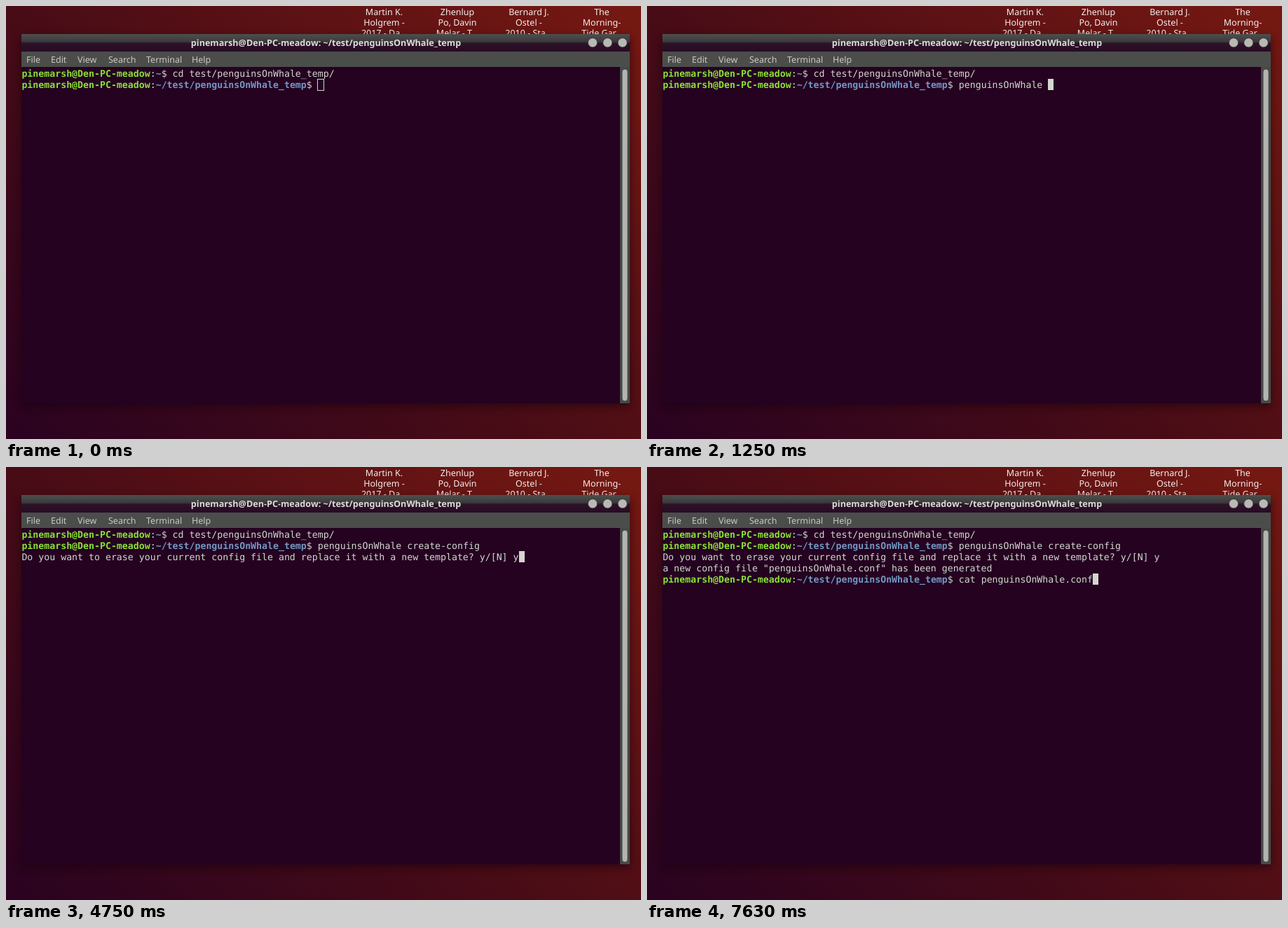
An HTML page that plays this animation: 906 by 618 pixels, repeating every 8 s.

```html
<!DOCTYPE html>
<html lang="en">
<head>
<meta charset="utf-8">
<title>Terminal session</title>
<style>
  html, body { margin: 0; width: 100%; height: 100%; overflow: hidden; background: #3c0918; }
  svg { display: block; width: 906px; height: 618px; }
  text { white-space: pre; text-rendering: geometricPrecision; }
  .ui { font: 12.5px "Noto Sans", "Open Sans", sans-serif; }
  .label { fill: #f4eeec; text-anchor: middle; }
  .menu { fill: #c9cac6; }
  .title { font-size: 12.6px; font-weight: 700; fill: #dcdcd8; text-anchor: middle; }
  .term { font: 13.24px "DejaVu Sans Mono", "Noto Sans Mono", monospace; fill: #d3d7cf; }
  .user { font-weight: 700; fill: #8ae234; }
  .path { font-weight: 700; fill: #7398c3; }
</style>
</head>
<body>
<svg viewBox="0 0 906 618">
  <defs>
    <linearGradient id="desk" gradientUnits="userSpaceOnUse" x1="130" y1="690" x2="776" y2="-72">
      <stop offset="0" stop-color="#2b0320"/>
      <stop offset=".46" stop-color="#490c16"/>
      <stop offset="1" stop-color="#741812"/>
    </linearGradient>
    <linearGradient id="bar" x2="0" y2="1">
      <stop offset="0" stop-color="#4d4f4d"/>
      <stop offset=".44" stop-color="#3b3a3b"/>
      <stop offset=".52" stop-color="#2c1329"/>
      <stop offset="1" stop-color="#290a24"/>
    </linearGradient>
    <filter id="blur" x="-5%" y="-5%" width="110%" height="110%">
      <feGaussianBlur stdDeviation="6"/>
    </filter>
  </defs>
  <rect width="906" height="618" fill="url(#desk)"/>
  <g id="labels" class="ui label"></g>
  <rect x="21" y="45" width="870" height="527" fill="#18000f" opacity=".55" filter="url(#blur)"/>
  <rect x="22" y="40" width="868" height="527" fill="#240220"/>
  <rect x="22" y="40" width="868" height="25" fill="url(#bar)"/>
  <rect x="22" y="65" width="868" height="22" fill="#4b4d4b"/>
  <rect x="876" y="87" width="14" height="480" fill="#474947"/>
  <rect x="879" y="90" width="8" height="474" rx="4" fill="#b4b4ae" stroke="#3c3d3b" stroke-width=".8"/>
  <g fill="#b9b9b4" stroke="#3a2c38" stroke-width=".8">
    <circle cx="837" cy="52.3" r="6.6"/>
    <circle cx="858.3" cy="52.3" r="6.6"/>
    <circle cx="879.6" cy="52.3" r="6.6"/>
  </g>
  <text id="title" class="ui title" x="456.5" y="56.5"></text>
  <g id="menu" class="ui menu"></g>
  <g id="screen" class="term"></g>
  <rect id="block" width="8" height="16" fill="#d3d7cf"/>
  <rect id="hollow" x="444.5" y="104.5" width="9" height="16" fill="none" stroke="#d3d7cf"/>
</svg>
<script>
const LOOP = 8000, LEFT = 22.4, PITCH = 7.97, ROW = 16;
const USER = 'pinemarsh@Den-PC-meadow', DIR = '~/test/penguinsOnWhale_temp';
const QUESTION = 'Do you want to erase your current config file and replace it with a new template? y/[N] ';
const TOOL = 'penguinsOnWhale', CREATE = TOOL + ' create-config';
const $ = id => document.getElementById(id);

function addText(parent, x, y, content, cls) {
  const el = document.createElementNS('http://www.w3.org/2000/svg', 'text');
  el.setAttribute('x', x);
  el.setAttribute('y', y);
  if (cls) el.setAttribute('class', cls);
  el.textContent = content;
  parent.append(el);
  return el;
}
const colX = col => LEFT + col * PITCH;
const put = (row, col, content, cls) =>
  addText($('screen'), colX(col), 101 + row * ROW, content, cls);

// Draws a shell prompt and returns the column where the command starts.
function prompt(row, dir) {
  const start = USER.length + 1, end = start + dir.length;
  put(row, 0, USER, 'user');
  put(row, start - 1, ':');
  put(row, start, dir, 'path');
  put(row, end, '$');
  return end + 2;
}

[
  [539.5, 'Martin K.', 'Holgrem -', '2017 - Da…'],
  [644, 'Zhenlup', 'Po, Davin', 'Melar - T…'],
  [746, 'Bernard J.', 'Ostel -', '2010 - Sta…'],
  [850, 'The', 'Morning-', 'Tide Gar…']
].forEach(([x, ...lines]) =>
  lines.forEach((s, i) => addText($('labels'), x, 13 + i * 15, s)));

Object.entries({ File: 29, Edit: 64, View: 102, Search: 146, Terminal: 200, Help: 265 })
  .forEach(([name, x]) => addText($('menu'), x, 80.5, name));
$('title').textContent = USER + ': ' + DIR;

put(0, prompt(0, '~'), 'cd test/penguinsOnWhale_temp/');
const cmdCol = prompt(1, DIR);
const command = put(1, cmdCol, '');
const question = put(2, 0, '');

// Everything that appears after the answer is given.
const before = $('screen').childElementCount;
put(3, 0, `a new config file "${TOOL}.conf" has been generated`);
prompt(4, DIR);
const follow = put(4, cmdCol, '');
const late = [...$('screen').children].slice(before);

// Each entry: time, row being edited, its text, cursor shown.
const steps = [[0, 1, '', false], [250, 1, '', true]];
const type = (row, base, added, times) =>
  times.forEach((t, i) => steps.push([t, row, base + added.slice(0, i + 1), true]));

type(1, '', 'peng', [630, 750, 880, 1000]);
steps.push([1130, 1, TOOL + ' ', true], [1750, 1, TOOL + ' ', false]);
type(1, TOOL + ' ', 'create-conf',
  [1880, 2000, 2130, 2380, 2500, 2630, 2750, 2880, 3000, 3130, 3250]);
steps.push(
  [3380, 1, CREATE, true],
  [3500, 2, QUESTION, false], [3880, 2, QUESTION, true], [4500, 2, QUESTION, false],
  [4750, 2, QUESTION + 'y', true], [5380, 2, QUESTION + 'y', false],
  [5880, 4, '', true]
);
type(4, '', 'cat', [6000, 6130, 6380]);
type(4, 'cat ', 'peng', [6750, 6880, 7000, 7130]);
steps.push([7250, 4, `cat ${TOOL}.conf`, true]);

const show = (el, on) => el.style.display = on ? '' : 'none';
let shown;
function draw() {
  const t = performance.now() % LOOP;
  const step = steps.findLast(s => s[0] <= t);
  if (step !== shown) {
    shown = step;
    const [time, row, content, cursor] = step;
    command.textContent = row > 1 ? CREATE : content;
    question.textContent = row > 2 ? QUESTION + 'y' : row === 2 ? content : '';
    follow.textContent = row === 4 ? content : '';
    late.forEach(el => show(el, row === 4));
    const col = content.length + (row === 2 ? 0 : cmdCol);
    $('block').setAttribute('x', Math.round(colX(col)));
    $('block').setAttribute('y', 88 + row * ROW);
    show($('block'), cursor);
    show($('hollow'), time === 0);
  }
  requestAnimationFrame(draw);
}
draw();
</script>
</body>
</html>
```
